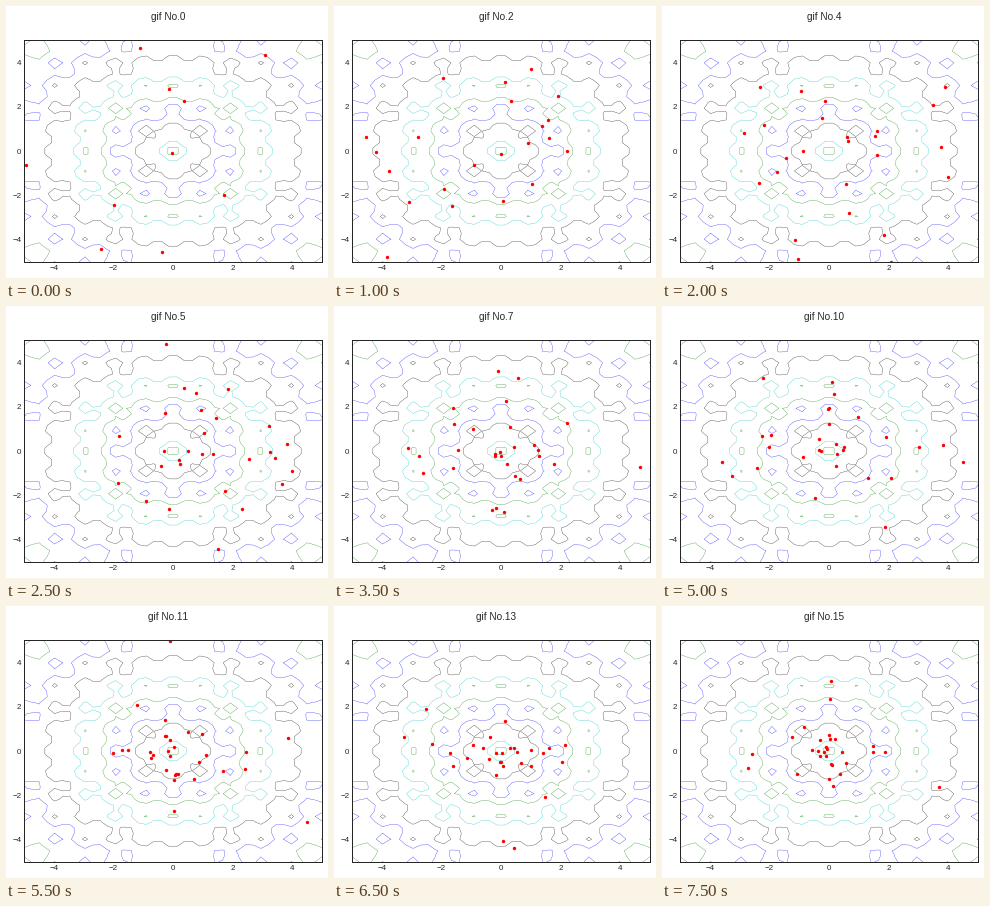
A matplotlib script for the animation above (8000 ms loop, 322 by 272 pixels).

```python
import numpy as np
import matplotlib.pyplot as plt
from matplotlib.animation import FuncAnimation

W, H, DPI = 322, 272, 100
PX = 72 / DPI  # one pixel in points
FRAMES, STEP_MS = 16, 500
N, SPAN = 32, 8  # swarm size, half width of the starting area
INERTIA, PULL = 0.73, 1.5

plt.rcParams["font.family"] = "Liberation Sans"
plt.rcParams["text.kerning_factor"] = 6
INK = "0.15"


def ackley(x, y):
    bowl = -20 * np.exp(-0.2 * np.sqrt((x**2 + y**2) / 2))
    waves = -np.exp((np.cos(2 * np.pi * x) + np.cos(2 * np.pi * y)) / 2)
    return bowl + waves + 20 + np.e


def swarm_track(seed):
    """Particle swarm search: positions of all particles at every step."""
    rng = np.random.default_rng(seed)
    pos = rng.uniform(-SPAN, SPAN, (N, 2))
    vel = rng.uniform(-SPAN / 2, SPAN / 2, (N, 2))
    best = pos.copy()
    track = [pos]
    for _ in range(FRAMES - 1):
        leader = best[np.argmin(ackley(*best.T))]
        own, social = rng.uniform(0, PULL, (2, N, 2))
        vel = INERTIA * vel + own * (best - pos) + social * (leader - pos)
        pos = pos + vel
        better = ackley(*pos.T) < ackley(*best.T)
        best[better] = pos[better]
        track.append(pos)
    return track


track = swarm_track(seed=4)

fig = plt.figure(figsize=(W / DPI, H / DPI), dpi=DPI, facecolor="white")
ax = fig.add_axes([18 / W, 1 - 256 / H, 298 / W, 222 / H])
ax.set(xlim=(-5, 5), ylim=(-5, 5))
ticks = range(-4, 5, 2)
ax.set_xticks(ticks)
ax.set_yticks(ticks)
ax.tick_params(length=0, pad=2.5 * PX, labelsize=8 * PX, labelcolor=INK)
for spine in ax.spines.values():
    spine.set(linewidth=PX, edgecolor=INK)

grid = np.linspace(-5, 5, 40)
X, Y = np.meshgrid(grid, grid)
ax.contour(X, Y, ackley(X, Y), levels=np.arange(0, 14, 1.5),
           colors=["b", "g", "c", "k"], linewidths=0.28 * PX)

dots, = ax.plot([], [], "o", color="red", markersize=3.4 * PX,
                markeredgewidth=0, zorder=2.4)
title = fig.text(0.503, 1 - 14 / H, "", fontsize=10 * PX, color=INK,
                 ha="center", va="baseline")


def update(i):
    dots.set_data(*track[i].T)
    title.set_text(f"gif No.{i}")
    return dots, title


anim = FuncAnimation(fig, update, frames=FRAMES, interval=STEP_MS,
                     repeat=True, repeat_delay=0)
plt.show()
```
